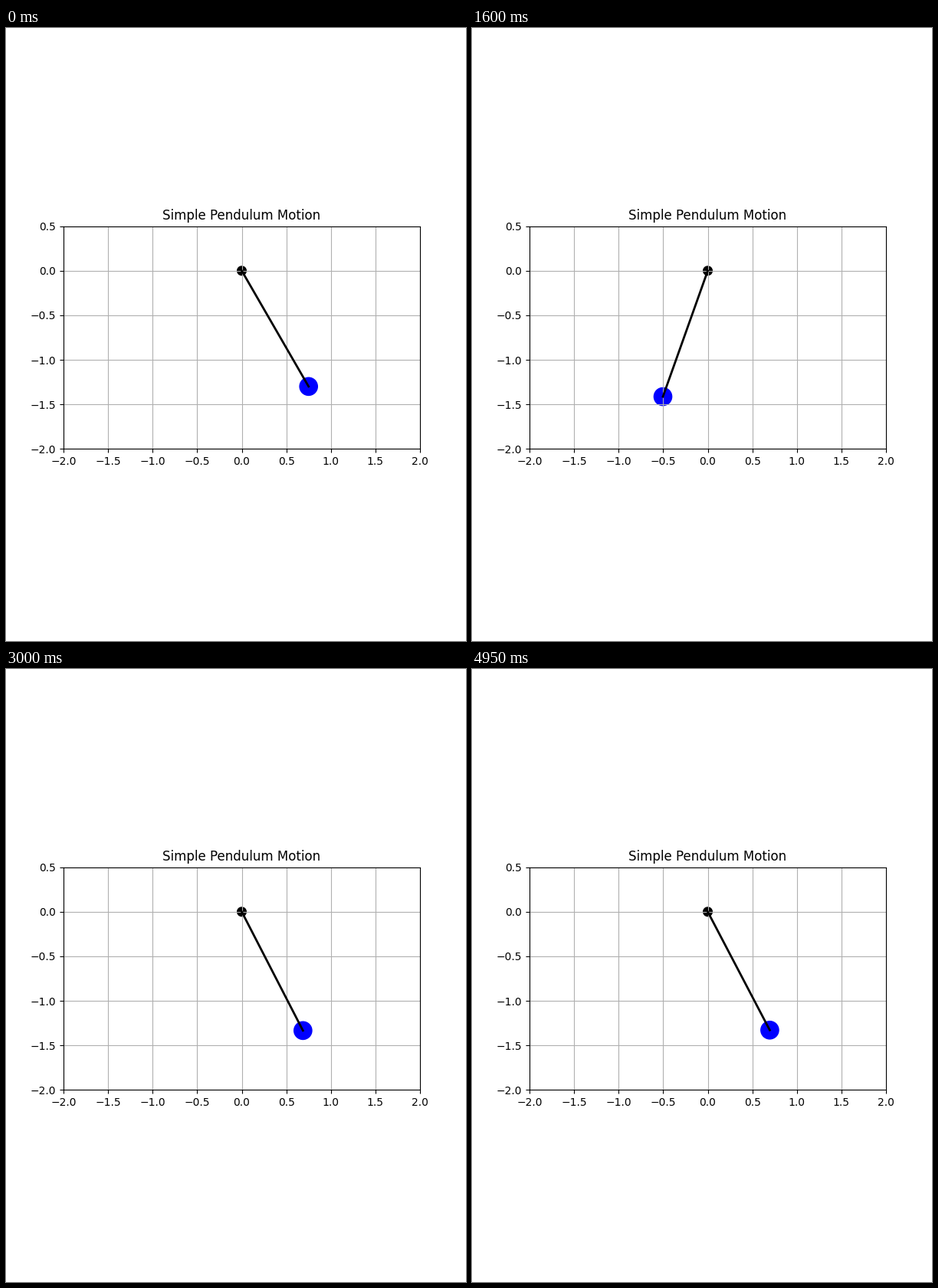
Recreate the animation shown at these times as a matplotlib script. Size 600 px wide and 800 px high, loop 5000 ms.

```python
import numpy as np
import matplotlib.pyplot as plt
from matplotlib.animation import FuncAnimation

GRAVITY = 9.81
LENGTH = 1.5
AMPLITUDE = np.pi / 6
FRAMES = 100
DURATION = 4 * np.pi  # simulated seconds per loop

omega = np.sqrt(GRAVITY / LENGTH)

fig, ax = plt.subplots(figsize=(6, 8), dpi=100)
ax.set_xlim(-2, 2)
ax.set_ylim(-2, 0.5)
ax.set_xticks(np.arange(-2, 2.1, 0.5))
ax.set_yticks(np.arange(-2, 0.6, 0.5))
ax.set_aspect("equal")
ax.grid(True)
ax.set_title("Simple Pendulum Motion")

rod, = ax.plot([], [], color="black", lw=2)
pivot = ax.add_patch(plt.Circle((0, 0), 0.05, color="black"))
bob = ax.add_patch(plt.Circle((0, -LENGTH), 0.1, color="blue"))


def bob_position(t):
    """Small-angle solution, released from rest."""
    theta = AMPLITUDE * np.cos(omega * t)
    return LENGTH * np.sin(theta), -LENGTH * np.cos(theta)


def update(frame):
    x, y = bob_position(frame * DURATION / FRAMES)
    rod.set_data([0, x], [0, y])
    bob.center = (x, y)
    return rod, bob


anim = FuncAnimation(fig, update, frames=FRAMES, interval=50, repeat=True)
plt.show()
```
